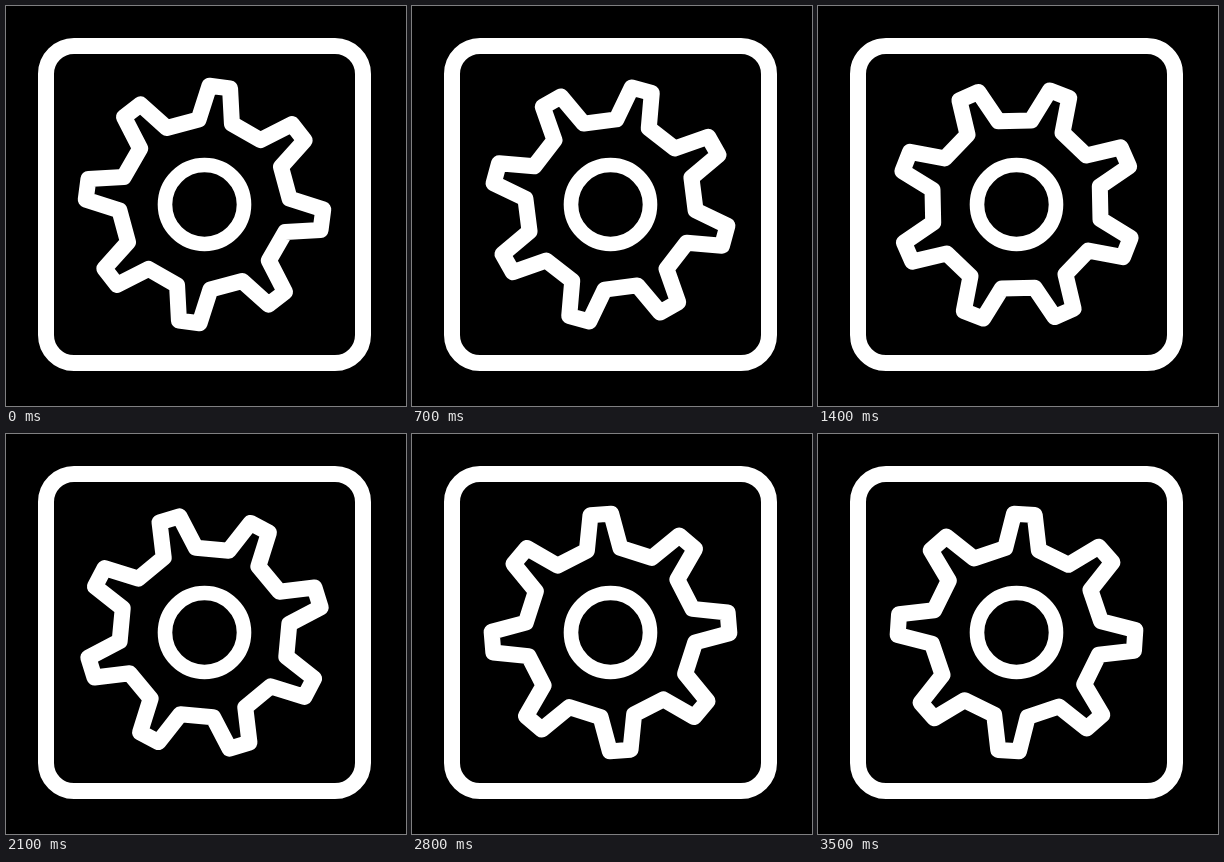
These frames come from a looping animation (400 px wide and 400 px high, 4200 ms). An HTML page:

```html
<!DOCTYPE html>
<html lang="en">
<head>
<meta charset="utf-8">
<title>Turning gear</title>
<style>
  html, body { margin: 0; width: 100%; height: 100%; overflow: hidden; background: #000; }
  svg { display: block; width: 100vw; height: 100vh; }
</style>
</head>
<body>
<svg viewBox="0 0 400 400" fill="none" stroke="#fff" stroke-linejoin="round">
  <rect x="40" y="40" width="317" height="317" rx="28" stroke-width="16"/>
  <g transform="translate(198.5 198.5)">
    <circle r="39.5" stroke-width="14.6"/>
    <path id="gear" stroke-width="16"/>
  </g>
</svg>
<script>
const HOLD = 700;
const ANGLES = [7.4, 15.3, 21.3, 27.8, 40.3, 48.8];
const TEETH = 8;
// Half a tooth pointing up: base and tip as [half width, height].
const BASE = [16.8, 83.6], TIP = [10.4, 118.4];

const gear = document.getElementById('gear');

function gearPath() {
  const points = [];
  for (let i = 0; i < TEETH; i++) {
    const a = i * 2 * Math.PI / TEETH, c = Math.cos(a), s = Math.sin(a);
    const put = (x, h) => points.push(`${(x * c + h * s).toFixed(2)} ${(x * s - h * c).toFixed(2)}`);
    put(-BASE[0], BASE[1]);
    put(-TIP[0], TIP[1]);
    put(TIP[0], TIP[1]);
    put(BASE[0], BASE[1]);
  }
  return `M${points.join('L')}Z`;
}

function draw(time) {
  const step = Math.floor(time / HOLD) % ANGLES.length;
  gear.setAttribute('transform', `rotate(${ANGLES[step]})`);
}

function tick() {
  draw(performance.now());
  requestAnimationFrame(tick);
}

gear.setAttribute('d', gearPath());
tick();
</script>
</body>
</html>
```
